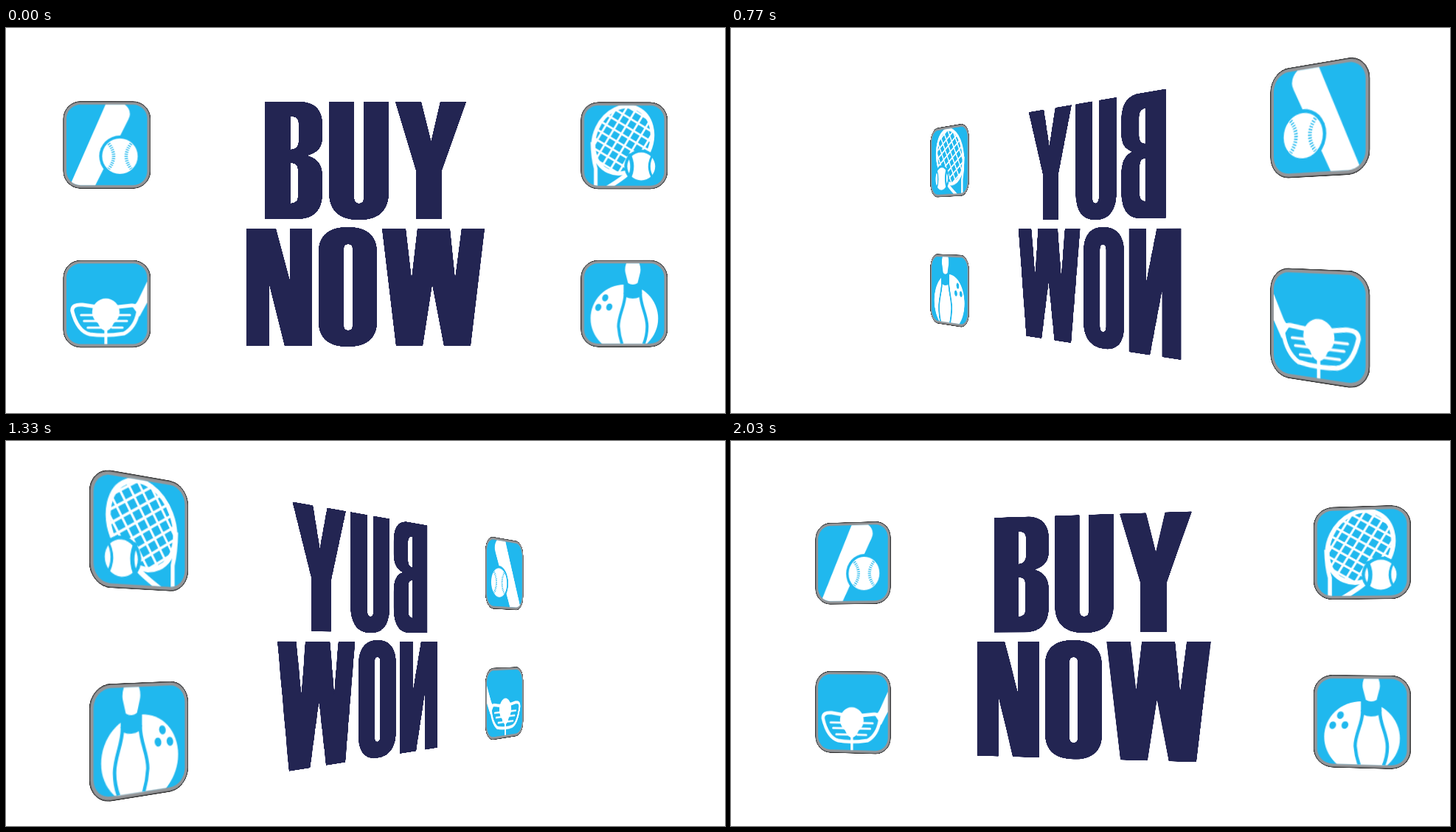
These frames come from a looping animation (975x522 px, 2.1 s). An HTML page:

```html
<!DOCTYPE html>
<html lang="en">
<head>
<meta charset="utf-8">
<title>Buy now</title>
<style>
  html, body { margin: 0; width: 100%; height: 100%; overflow: hidden; background: #fff; }
  #stage {
    position: relative; width: 975px; height: 522px; overflow: hidden;
    perspective: 1120px; perspective-origin: 488px 273.5px;
    filter: url(#crisp);
  }
  #panel { position: absolute; left: 0; top: 0; transform-origin: 488px 273.5px; overflow: visible; }
  .word { fill: #232552; fill-rule: evenodd; }
  .sky { fill: #20b8ee; }
  .white { fill: #fff; }
  .line { fill: none; stroke: #fff; }
  .cut { fill: none; stroke: #20b8ee; }
</style>
</head>
<body>
<!-- hard outer edges: partly covered pixels become solid -->
<svg width="0" height="0" style="position:absolute">
  <filter id="crisp" x="0" y="0" width="1" height="1" color-interpolation-filters="sRGB">
    <feComponentTransfer><feFuncA type="linear" slope="4" intercept="-.6"/></feComponentTransfer>
  </filter>
</svg>
<div id="stage">
<svg id="panel" width="975" height="522" viewBox="0 0 975 522" role="img" aria-label="BUY NOW">
  <defs>
    <clipPath id="inner"><rect x="4.300" y="4.300" width="109" height="109" rx="19"/></clipPath>
    <clipPath id="head"><ellipse rx="38" ry="46.500"/></clipPath>
    <g id="tile">
      <rect x=".3" y=".3" width="117" height="117" rx="23" fill="#939598" stroke="#111" stroke-width=".6"/>
      <rect class="sky" x="4.300" y="4.300" width="109" height="109" rx="19"/>
    </g>
  </defs>

  <g class="word">
    <path d="M351 100H396C418 100 429 110 429 131V147C429 163 422 169 408 173C422 177 429 184 429 202V223C429 248 417 259 394 259H351Z
      M386 120H389Q397 121 397 130V154Q397 164 386 165Z M386 183H388Q396 184 396 192V229Q396 237 386 238Z"/>
    <path d="M438 100H472V231Q473 238 478.500 238Q485 238 485 231V100H519V222C519 248 505 260 479 260C452 260 438 248 438 222Z"/>
    <path d="M528 100H563L576.500 154L589 100H624L591 193V259H556V193Z"/>
    <path d="M326 272H366L385 343V272H415V431H378L357 347V431H326Z"/>
    <path d="M424 304C424 281 438 270 463.500 270C489 270 503 281 503 304V398C503 421 489 432 463.500 432C438 432 424 421 424 398Z
      M458 300V403Q458 410 464 410Q470 410 470 403V300Q470 293 464 293Q458 293 458 300Z"/>
    <path d="M510 272H542L550 341L558 272H602L609 341L618 272H649L630 431H594L578 347L565 431H529Z"/>
  </g>

  <!-- baseball -->
  <g transform="translate(78.700 100)">
    <use href="#tile"/>
    <g clip-path="url(#inner)">
      <path class="white" d="M58 2H80Q90 8 90 17Q90 20 88 24L42 116H8Z"/>
      <circle class="sky" cx="76.500" cy="74" r="28"/>
      <circle class="white" cx="76.500" cy="74" r="24"/>
      <g class="cut" stroke-width="4.500" stroke-dasharray="1.300 1.700">
        <path d="M61.500 57Q74.500 74 61.500 91"/><path d="M91.500 57Q78.500 74 91.500 91"/>
      </g>
    </g>
  </g>

  <!-- tennis -->
  <g transform="translate(780.300 100.500)">
    <use href="#tile"/>
    <g clip-path="url(#inner)">
      <path class="line" stroke-width="5" d="M15.500 54Q16 76 20 90V116"/>
      <path class="line" stroke-width="6" d="M68 92Q62 100 36 116"/>
      <g transform="translate(57 51) rotate(25)">
        <ellipse class="sky" rx="38.500" ry="47"/>
        <g clip-path="url(#head)">
          <path id="strings" class="line" stroke-width="2.800" transform="rotate(6)"/>
        </g>
        <ellipse class="line" rx="38.500" ry="47" stroke-width="5.500"/>
      </g>
      <circle class="sky" cx="82" cy="87" r="23"/>
      <circle class="white" cx="82" cy="87" r="19"/>
      <path class="cut" stroke-width="5" d="M65 70Q74 87 65 104"/>
      <path class="cut" stroke-width="3" d="M99 69Q87 87 99 105"/>
    </g>
  </g>

  <!-- golf -->
  <g transform="translate(78.700 315)">
    <use href="#tile"/>
    <g clip-path="url(#inner)">
      <path class="white" d="M93 62Q98 60 101 54L116 23V52L103 76Z"/>
      <path class="line" stroke-width="5" stroke-linejoin="round"
        d="M12 68Q12 59 26 60L46 63H74L92 61Q102 60 101 70Q97 91 82 99Q58 103 36 100Q19 96 12 68Z"/>
      <path class="line" stroke-width="3" stroke-linecap="round"
        d="M24 74H42M28 82H46M33 91H51M74 74H90M70 82H86M66 91H80"/>
      <circle class="white" cx="57.500" cy="70" r="18.500"/>
      <path class="white" d="M46 81H69Q67 92 59.500 95V115H55.500V95Q48 92 46 81Z"/>
    </g>
  </g>

  <!-- bowling -->
  <g transform="translate(780.300 315)">
    <use href="#tile"/>
    <g clip-path="url(#inner)">
      <circle class="white" cx="59" cy="79" r="46"/>
      <g class="sky">
        <ellipse cx="33" cy="51" rx="4" ry="5" transform="rotate(25 33 51)"/>
        <ellipse cx="23.500" cy="64" rx="4" ry="5" transform="rotate(25 23.500 64)"/>
        <ellipse cx="38.500" cy="63.500" rx="4" ry="5" transform="rotate(25 38.500 63.500)"/>
      </g>
      <path class="white" stroke="#20b8ee" stroke-width="4"
        d="M60 46C60 62 51 74 51 90Q52 104 57 117H84Q90 104 90 90C90 74 81 62 81 46Z"/>
      <path class="sky" d="M58 30H83V45Q82 52 70.500 52Q59 52 58 45Z"/>
      <path class="white" d="M62 3H79Q82 11 80.500 17L77 31Q70.500 35 64 31L60.500 17Q59 11 62 3Z"/>
    </g>
  </g>
</svg>
</div>
<script>
  const LOOP = 2100, STEPS = 30, LEAN = 0.4;
  const panel = document.getElementById('panel');

  let grid = '';
  for (let p = -42; p <= 42; p += 12) grid += `M${p} -55V55M-55 ${p}H55`;
  document.getElementById('strings').setAttribute('d', grid);

  function draw(now) {
    const step = Math.floor((now % LOOP) / LOOP * STEPS);
    panel.style.transform = `rotateY(${step * 360 / STEPS + LEAN}deg)`;
  }

  const start = performance.now();
  draw(0);
  (function tick() {
    draw(performance.now() - start);
    requestAnimationFrame(tick);
  })();
</script>
</body>
</html>
```
